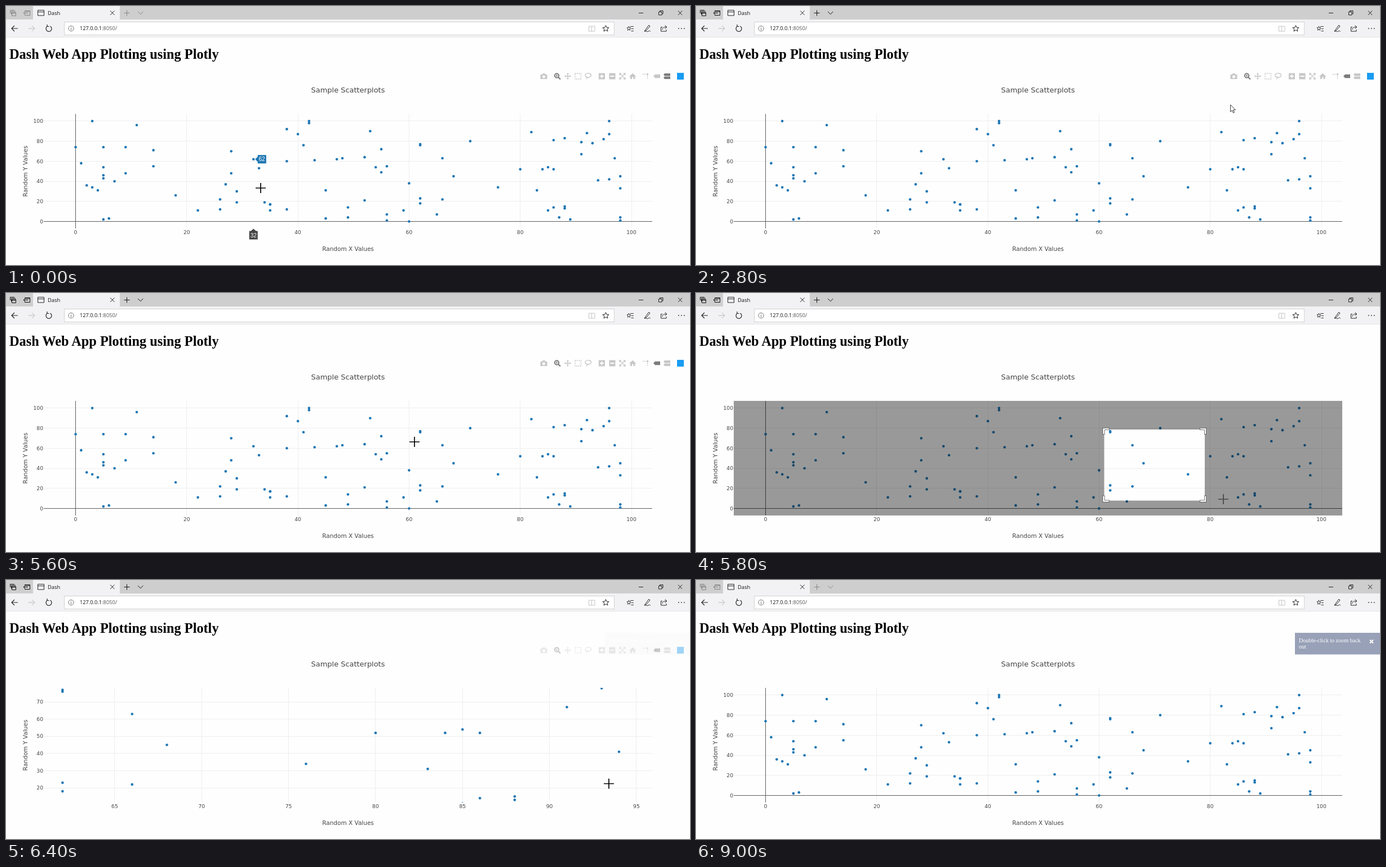
An HTML page that plays this animation: 1214 px wide and 461 px high, repeating every 9.2 s.

```html
<!DOCTYPE html>
<html lang="en">
<head>
<meta charset="utf-8">
<title>Dash</title>
<style>
html, body { margin: 0; width: 100%; height: 100%; overflow: hidden; background: #fefefe; }
svg { display: block; width: 1214px; height: 461px; }
text { font-family: "DejaVu Sans", Verdana, sans-serif; fill: #444; }
.ui { font-family: "Open Sans", "Noto Sans", sans-serif; fill: #111; }
.serif { font-family: "Liberation Serif", "Times New Roman", serif; }
.label { font: 10px "Liberation Sans", Arial, sans-serif; fill: #fff; }
.line { fill: none; stroke: currentColor; }
.tick { font-size: 9.2px; }
.mid { text-anchor: middle; }
.end { text-anchor: end; }
#bar { color: #c7c7c7; }
#bar .fill { fill: currentColor; stroke: none; }
#bar .on { color: #7c7c7c; }
</style>
</head>
<body>
<svg viewBox="0 0 1214 461">
  <rect width="1214" height="24" fill="#cecece"/>
  <rect y="24" width="1214" height="31" fill="#f2f2f4"/>
  <rect x="48" width="154" height="25" fill="#f2f2f4"/>
  <path d="M0 55.5H1214" stroke="#e4e4e6"/>
  <rect x="103.5" y="28.5" width="976" height="23" fill="#fff" stroke="#d2d2d4"/>

  <!-- tab strip controls, dimmed when the window loses focus -->
  <g id="strip" class="line">
    <path d="M7.5 13V7.5H15M9.5 15V9.5H17M10.5 11.5h7v6h-7zM10.5 13h7"/>
    <path d="M33.5 10V8.5H42.5V16.5H33.5V14.5M33.5 10H42.5M31 12.5H39M33.5 10.3L31 12.5L33.5 14.7"/>
    <path d="M214.5 7.5V17.5M209.5 12.5H219.5M234 10L238.7 14.7L243.4 10"/>
  </g>
  <g class="line" color="#222">
    <path d="M56.5 7.5H67.5V17H56.5zM56.5 10.5H67.5"/>
    <path d="M185 8.5L192.5 16M192.5 8.5L185 16"/>
    <path d="M1123 12.5H1131M1158.5 10.5H1164V16H1158.5zM1160.5 10V8.5H1166V14H1164.5M1193 8.5L1200 16M1200 8.5L1193 16"/>
    <path d="M10 40H21M15 35L10 40L15 45" stroke-width="1.2"/>
    <path d="M40 40H51M46 35L51 40L46 45" color="#b8b8b8"/>
    <path d="M73.5 36A5 5 0 1 0 78.5 36M73 33V36.5H76.5" stroke-width="1.2"/>
    <g color="#777"><circle cx="115.5" cy="40" r="4.7"/><path d="M115.5 39V43M115.5 37V38"/></g>
    <path d="M1034.5 36H1039.5V45H1034.5zM1039.5 36H1045V45H1039.5z" color="#c4c4c4"/>
    <path d="M1064.5 34.5l1.6 3.7 4 .3-3.1 2.6 1 3.9-3.5-2.1-3.5 2.1 1-3.9-3.1-2.6 4-.3z"/>
    <path d="M1108 36.5H1114M1109.5 40.5H1114M1109.5 44.5H1114M1105.5 36l1 2.6 2.5.2-2 1.8.6 2.6-2.1-1.4-2.1 1.4.6-2.6-2-1.8 2.5-.2z" stroke-width=".9"/>
    <path d="M1133 45L1141 34L1143 36L1136 44L1133 45C1138 44 1137 47 1140 45S1142 45 1144 45"/>
    <path d="M1165 37.5H1162.5V45H1172V42M1165 42C1165 38.5 1167 37.5 1172 37.5M1169.5 34.5L1173 37.5L1169.5 40.5"/>
    <path d="M1193 40H1205" stroke-width="1.6" stroke-dasharray="1.6 3.4"/>
  </g>
  <text class="ui" x="74" y="15.5" font-size="9.4">Dash</text>
  <text class="ui" x="131" y="43.3" font-size="9.25">127.0.0.1<tspan fill="#555">:8050/</tspan></text>

  <text class="serif" x="6" y="94" font-size="24.3" font-weight="bold" style="fill:#000">Dash Web App Plotting using Plotly</text>
  <text class="mid" x="607" y="154" font-size="12.95">Sample Scatterplots</text>
  <text class="mid" x="607" y="436" font-size="10.5">Random X Values</text>
  <text class="mid" transform="translate(38 294) rotate(-90)" font-size="10.5">Random Y Values</text>

  <g id="bar" class="line">
    <path class="fill" fill-rule="evenodd" d="M948.5 122h3l1-2h4l1 2h3v8h-12zM954.5 123.3a2.6 2.6 0 1 0 .1 0z"/>
    <g class="on"><circle cx="977.5" cy="124" r="3.7" stroke-width="2"/><path d="M980.5 127L984 130.5" stroke-width="2.2"/><path d="M975.5 124H979.5M977.5 122V126"/></g>
    <path d="M992 125H1002M997 120V130" stroke-width="1.3"/>
    <path class="fill" d="M991 125l2.5-2.3v4.6zM1003 125l-2.5-2.3v4.6zM997 119l-2.3 2.5h4.6zM997 131l-2.3-2.5h4.6z"/>
    <path d="M1010 120H1020.5V130H1010z" stroke-width="1.3" stroke-dasharray="2 1.4"/>
    <path d="M1030 127C1025 122 1031 119 1034 120C1040 120 1040 126 1034 127C1031 128 1029 125 1031 126S1032 129 1030 130" stroke-width="1.3"/>
    <path class="fill" d="M1052 119.5h11v11h-11zM1070.5 119.5h11v11h-11z"/>
    <path d="M1054 125H1061M1057.5 121.5V128.5M1072.5 125H1079.5" stroke="#fefefe" stroke-width="1.8"/>
    <path d="M1089 123V120H1092M1096 120H1099V123M1099 127V130H1096M1092 130H1089V127M1090 121L1098 129M1098 121L1090 129" stroke-width="1.4"/>
    <path class="fill" d="M1106 125.5l6.3-5.8 6.2 5.8h-2v4.5h-3v-3.5h-2.5v3.5h-3v-4.5z"/>
    <path d="M1130 121.5H1136M1138.5 124V130" stroke-width="1.4" stroke-dasharray="2 1.5"/>
    <path class="fill" d="M1137 120h3v3h-3z"/>
    <path id="single" class="fill" d="M1149 125l3-3.3h9v6.6h-9z"/>
    <path id="compare" class="fill" d="M1167 122.2l2-2.2h10v4.5h-10zM1167 127.7l2-2.2h10v4.5h-10z"/>
    <rect x="1191" y="119" width="12" height="12" fill="#199cf2" stroke="none"/>
  </g>

  <clipPath id="area"><rect x="67" y="192" width="1080" height="204"/></clipPath>
  <g id="plot"></g>

  <g id="toast">
    <rect x="1063" y="94" width="151" height="38.5" fill="#98a1b7"/>
    <text class="serif" font-size="10.1" style="fill:#fff"><tspan x="1070" y="111">Double-click to zoom back</tspan><tspan x="1070" y="122">out</tspan></text>
    <path d="M1196 106.5L1202 112.5M1202 106.5L1196 112.5" stroke="#fff" stroke-width="2"/>
  </g>
  <g id="pointer"></g>
</svg>
<script>
const LOOP = 9200, STEP = 200;
const LEFT = 67, RIGHT = 1147, TOP = 192, BOTTOM = 396;
const BLUE = "#1f77b4";

// moments of the session
const MODE_CLICK = 2200, DRAG = 5800, ZOOM = 6280, RESET = 8000, LEAVE = 8600, BLUR = 9000;

const full = { x0: -5.73, x1: 103.75, y0: -7, y1: 107.2, dx: 20, dy: 20 };
const zoomed = { x0: 60.92, x1: 95.91, y0: 11.5, y1: 78.2, dx: 5, dy: 10 };

// points that are hovered or zoomed into; seeded noise fills the rest of the cloud
const marks = [
  [32, 62], [38, 60], [0, 74], [60, 0], [96, 100], [98, 45],
  [62, 77], [62, 76], [62, 23], [62, 18], [66, 63], [66, 22], [68, 45], [76, 34], [80, 52], [83, 31],
  [84, 52], [85, 54], [86, 52], [86, 14], [88, 15], [88, 13], [91, 67], [93, 78], [94, 41]
];
let seed = 2019;
const random = () => (seed = seed * 16807 % 2147483647) / 2147483647;
const inZoom = ([x, y]) => x > zoomed.x0 && x < zoomed.x1 && y > zoomed.y0 && y < zoomed.y1;
const cloud = Array.from({ length: 90 }, () => [Math.floor(random() * 99), Math.floor(random() * 101)])
  .filter(p => !inZoom(p));

// pointer stops: time, x, y
const stops = [
  [0, 452, 324], [1800, 1151, 137], [MODE_CLICK, 1154, 126], [3800, 505, 283.5], [5600, 725, 265],
  [DRAG, 936, 367], [6000, 1070, 362.5], [6400, 1070, 362.5], [RESET, 820, 300], [LEAVE, 815, 480], [LOOP, 815, 480]
];

const $ = id => document.getElementById(id);
const clamp = v => Math.max(0, Math.min(1, v));
const smooth = k => k * k * (3 - 2 * k);
const cubic = k => k < .5 ? 4 * k ** 3 : 1 - 4 * (1 - k) ** 3;
const text = (x, y, s, cls) => `<text x="${x}" y="${y}" class="${cls}">${s}</text>`;
const stroke = (d, color, width = 1) => `<path d="${d}" fill="none" stroke="${color}" stroke-width="${width}"/>`;
const inside = (x, y) => x > LEFT && x < RIGHT && y > TOP && y < BOTTOM;

function pointerAt(t) {
  const i = stops.findIndex(s => s[0] > t), a = stops[i - 1], b = stops[i];
  const k = smooth((t - a[0]) / (b[0] - a[0]));
  return [a[1] + (b[1] - a[1]) * k, a[2] + (b[2] - a[2]) * k];
}

function ticks(lo, hi, step) {
  const out = [];
  for (let v = Math.ceil(lo / step) * step; v <= hi; v += step) out.push(v);
  return out;
}

function axes(view, px, py) {
  let grid = "", zero = "", labels = "";
  const rule = (v, d) => { if (v) grid += stroke(d, "#eee"); else zero += stroke(d, "#5c5c5c"); };
  for (const v of ticks(view.x0, view.x1, view.dx)) {
    rule(v, `M${Math.floor(px(v)) + .5} ${TOP}V${BOTTOM}`);
    labels += text(px(v), 406.3, v, "tick mid");
  }
  for (const v of ticks(view.y0, view.y1, view.dy)) {
    rule(v, `M${LEFT} ${Math.floor(py(v)) + .5}H${RIGHT}`);
    labels += text(66, py(v) + 3.2, v, "tick end");
  }
  return grid + zero + labels;
}

function nearest(points, mx, my, compare, px, py) {
  let best, reach = compare ? 20 : 12;
  for (const p of points) {
    const x = px(p[0]), y = py(p[1]);
    const dist = compare ? Math.abs(x - mx) : Math.hypot(x - mx, y - my);
    if (inside(x, y) && dist < reach) { reach = dist; best = p; }
  }
  return best;
}

function hover(mx, my, compare, px, py) {
  const find = points => nearest(points, mx, my, compare, px, py);
  const point = find(marks) || find(cloud);
  if (!point) return "";
  const x = px(point[0]), y = py(point[1]);
  const label = compare ? `${point[1]}` : `(${point[0]}, ${point[1]})`;
  const digits = label.replace(/\D/g, "").length;
  const width = 4 + 5.56 * digits + (compare ? 0 : 11.8);
  let out = `<path d="M${x + 3} ${y}l4.5-4.5v-3h${width}v15h${-width}v-3z" fill="${BLUE}"/>` +
    text(x + 9.3, y + 3.6, label, "label");
  if (compare) {
    out += `<path d="M${x} 396.5l4.5 4h3v15h-15v-15h3z" fill="#444"/>` + text(x, 411.8, point[0], "label mid");
  }
  return out;
}

function selection(x0, y0, x1, y1) {
  let out = `<path fill-rule="evenodd" fill-opacity=".4" d="M${LEFT} ${TOP}H${RIGHT}V${BOTTOM}H${LEFT}z M${x0} ${y0}H${x1}V${y1}H${x0}z"/>`;
  for (const [x, sx] of [[x0, 1], [x1, -1]]) for (const [y, sy] of [[y0, 1], [y1, -1]]) {
    const corner = e => `M${x - sx} ${y + sy * e}V${y - sy}H${x + sx * e}`;
    out += stroke(corner(9), "#444", 4) + stroke(corner(8.3), "#fff", 2.5);
  }
  return out;
}

function pointer(x, y, dragging) {
  if (inside(x, y)) {
    const d = `M${x - 9} ${y}H${x + 9}M${x} ${y - 9}V${y + 9}`;
    return `<g opacity="${dragging ? .55 : 1}">${stroke(d, "#000", 1.7)}</g>`;
  }
  return `<path d="M${x} ${y}v12.5l2.9-2.7 2 4.6 2-.9-2-4.4h3.9z" fill="#fff" stroke="#222" stroke-width=".9"/>`;
}

function draw(t) {
  const view = t >= ZOOM && t < RESET ? zoomed : full;
  const compare = t < MODE_CLICK, focused = !compare && t < BLUR;
  const dragging = t >= DRAG && t < ZOOM;
  const [mx, my] = pointerAt(t);
  const px = v => LEFT + (v - view.x0) / (view.x1 - view.x0) * (RIGHT - LEFT);
  const py = v => BOTTOM - (v - view.y0) / (view.y1 - view.y0) * (BOTTOM - TOP);

  const dots = [...marks, ...cloud].map(([x, y]) => `<circle cx="${px(x)}" cy="${py(y)}" r="2.3"/>`).join("");
  let plot = axes(view, px, py) + `<g fill="${BLUE}" clip-path="url(#area)">${dots}</g>`;
  // the first drag step trails the pointer
  if (dragging) plot += t < 6000 ? selection(724.5, 243, 903, 369.5) : selection(724.5, 243, mx, my);
  else if (inside(mx, my)) plot += hover(mx, my, compare, px, py);

  $("plot").innerHTML = plot;
  $("pointer").innerHTML = pointer(mx, my, dragging);
  $("strip").style.color = focused ? "#111" : "#858585";
  $("single").classList.toggle("on", !compare);
  $("compare").classList.toggle("on", compare);
  $("bar").style.opacity = t < DRAG ? 1 : t < LEAVE ? clamp((t - ZOOM) / 300) : 0;
  $("toast").style.opacity = cubic(clamp((t - ZOOM) / 700));
}

let shown = -1;
const start = performance.now();
function tick() {
  const t = Math.floor((performance.now() - start) % LOOP / STEP) * STEP;
  if (t !== shown) draw(shown = t);
  requestAnimationFrame(tick);
}
tick();
</script>
</body>
</html>
```
